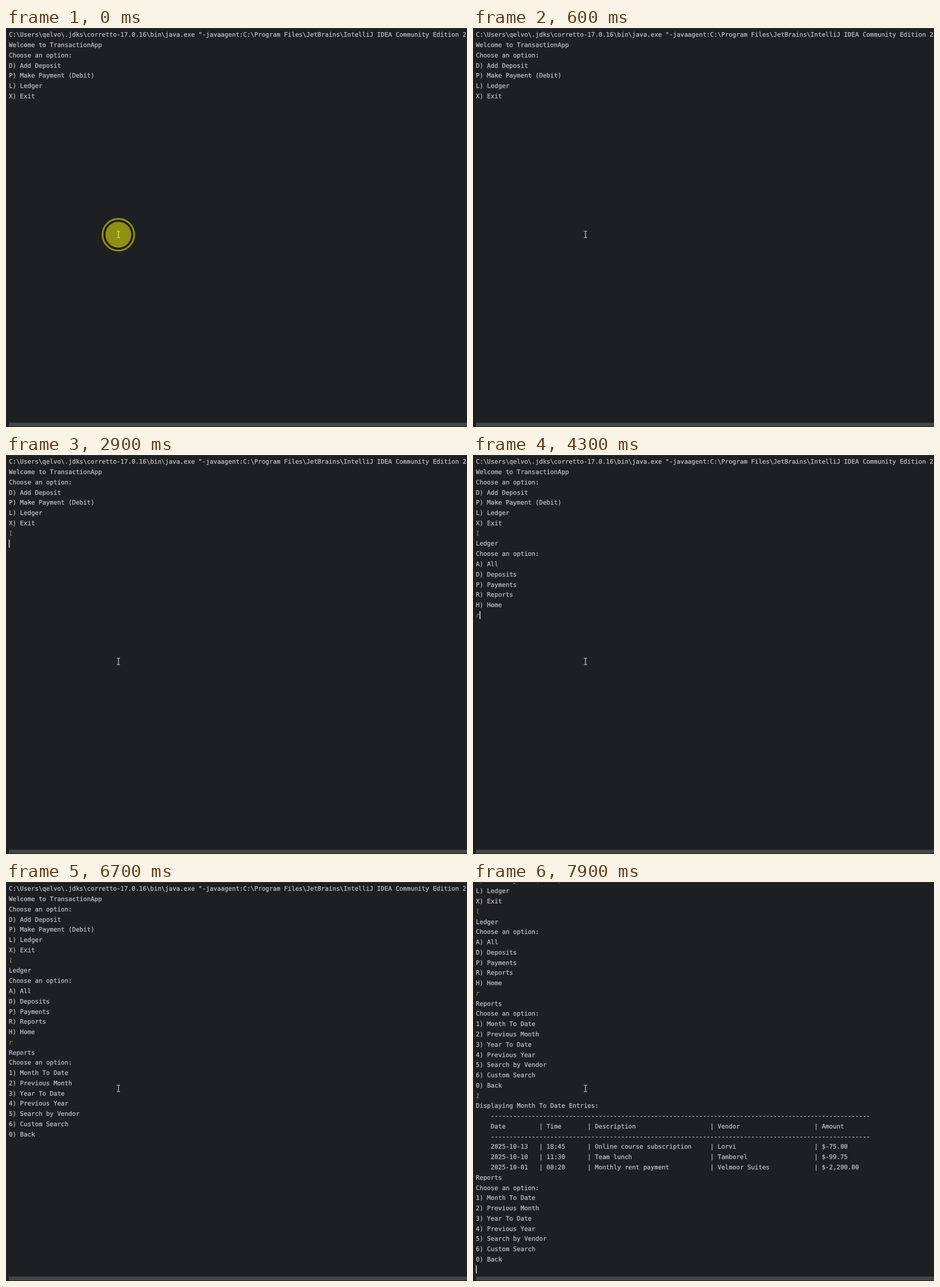
Write an HTML page with a canvas that moves like this. It is 800 px wide and 693 px high and loops after 8 s.

```html
<!DOCTYPE html>
<html lang="en">
<head>
<meta charset="utf-8">
<title>Console session</title>
<style>
  html, body { margin: 0; width: 100%; height: 100%; overflow: hidden; background: #1e1f22; }
  canvas { display: block; }
</style>
</head>
<body>
<canvas id="stage" width="800" height="693"></canvas>
<script>
const ctx = document.getElementById('stage').getContext('2d');
const LOOP = 8000, LEFT = 5, ADVANCE = 6.46, PITCH = 17.77, FIRST_MID = 11.6, LAST_MID = 673;
const FONT = '10.73px "DejaVu Sans Mono", "Noto Sans Mono", monospace';
const BACK = '#1e1f22';

const row = (date, time, text, vendor, amount) =>
  '    ' + date.padEnd(13) + '| ' + time.padEnd(11) + '| ' + text.padEnd(31) +
  '| ' + vendor.padEnd(26) + '| ' + amount;
const rule = '    ' + '-'.repeat(102);
const choose = 'Choose an option:';
const reports = ['Reports', choose, '1) Month To Date', '2) Previous Month', '3) Year To Date',
  '4) Previous Year', '5) Search by Vendor', '6) Custom Search', '0) Back'];

// Single-character lines are what the user typed.
const lines = [
  'C:\\Users\\qelvo\\.jdks\\corretto-17.0.16\\bin\\java.exe "-javaagent:C:\\Program Files\\JetBrains\\IntelliJ IDEA Community Edition 2',
  'Welcome to TransactionApp', choose,
  'D) Add Deposit', 'P) Make Payment (Debit)', 'L) Ledger', 'X) Exit',
  'l',
  'Ledger', choose, 'A) All', 'D) Deposits', 'P) Payments', 'R) Reports', 'H) Home',
  'r',
  ...reports,
  '1',
  'Displaying Month To Date Entries:',
  rule, row('Date', 'Time', 'Description', 'Vendor', 'Amount'), rule,
  row('2025-10-13', '18:45', 'Online course subscription', 'Lorvi', '$-75.00'),
  row('2025-10-10', '11:30', 'Team lunch', 'Tamborel', '$-99.75'),
  row('2025-10-01', '08:20', 'Monthly rent payment', 'Velmoor Suites', '$-2,200.00'),
  ...reports
];

// [start time, visible lines, caret column or -1 when hidden]
const states = [
  [0, 7, -1], [100, 7, 0], [600, 7, -1], [1100, 7, 0], [1600, 7, -1],
  [2100, 8, 1], [2600, 8, -1], [2900, 8, 0],
  [3100, 15, 0], [4000, 15, -1], [4300, 16, 1],
  [4700, 25, 0], [5700, 25, -1], [6100, 25, 0], [6700, 25, -1],
  [7200, 26, 1], [7600, 26, 0], [7900, 42, 0]
];

const midY = i => FIRST_MID + i * PITCH;

function box(color, x, y, w, h) {
  ctx.fillStyle = color;
  ctx.fillRect(x, y, w, h);
}

function drawPointer() {
  const c = '#d0d1d4';
  box(c, 194.6, 353.5, 1.2, 10.2);
  for (const y of [352.5, 363.5]) box(c, 192.4, y, 5.6, 1.1);
}

// Click highlight: the disc and its widening ring fade in 100 ms steps.
function drawClick(t) {
  const p = Math.floor(t / 100) / 6;
  if (p >= 1) return;
  ctx.globalAlpha = 0.5 * (1 - p);
  ctx.fillStyle = ctx.strokeStyle = '#ffff00';
  ctx.beginPath();
  ctx.arc(195, 359, 22.5, 0, Math.PI * 2);
  ctx.fill();
  ctx.lineWidth = 3;
  ctx.beginPath();
  ctx.arc(195, 359, 27.5 + 6 * p, 0, Math.PI * 2);
  ctx.stroke();
  ctx.globalAlpha = 1;
}

// A hairline outline gives the text its medium weight.
function drawText(text, y) {
  const typed = text.length === 1;
  ctx.font = (typed ? 'italic ' : '') + FONT;
  ctx.fillStyle = ctx.strokeStyle = typed ? '#78904e' : '#bcbec4';
  ctx.lineWidth = 0.25;
  ctx.fillText(text, LEFT, y);
  ctx.strokeText(text, LEFT, y);
}

function draw(t) {
  const [, count, caret] = states.findLast(s => s[0] <= t);
  const scroll = Math.max(0, midY(count) - LAST_MID);
  box(BACK, 0, 0, 800, 693);

  ctx.textRendering = 'geometricPrecision';
  lines.slice(0, count).forEach((text, i) => drawText(text, midY(i) - scroll + 3.7));

  if (caret >= 0) {
    const y = Math.round(midY(count - caret) - scroll - 7.2);
    box('#ced0d6', LEFT + caret * ADVANCE - 0.2, y, 1.7, 14);
  }
  box(BACK, 0, 0, 800, 2);
  box('#2b2d30', 0, 0, 800, 1.4);
  box('#444547', 5, 685.5, 795, 6.5);
  drawPointer();
  drawClick(t);
}

function tick() {
  draw(performance.now() % LOOP);
  requestAnimationFrame(tick);
}
tick();
</script>
</body>
</html>
```
